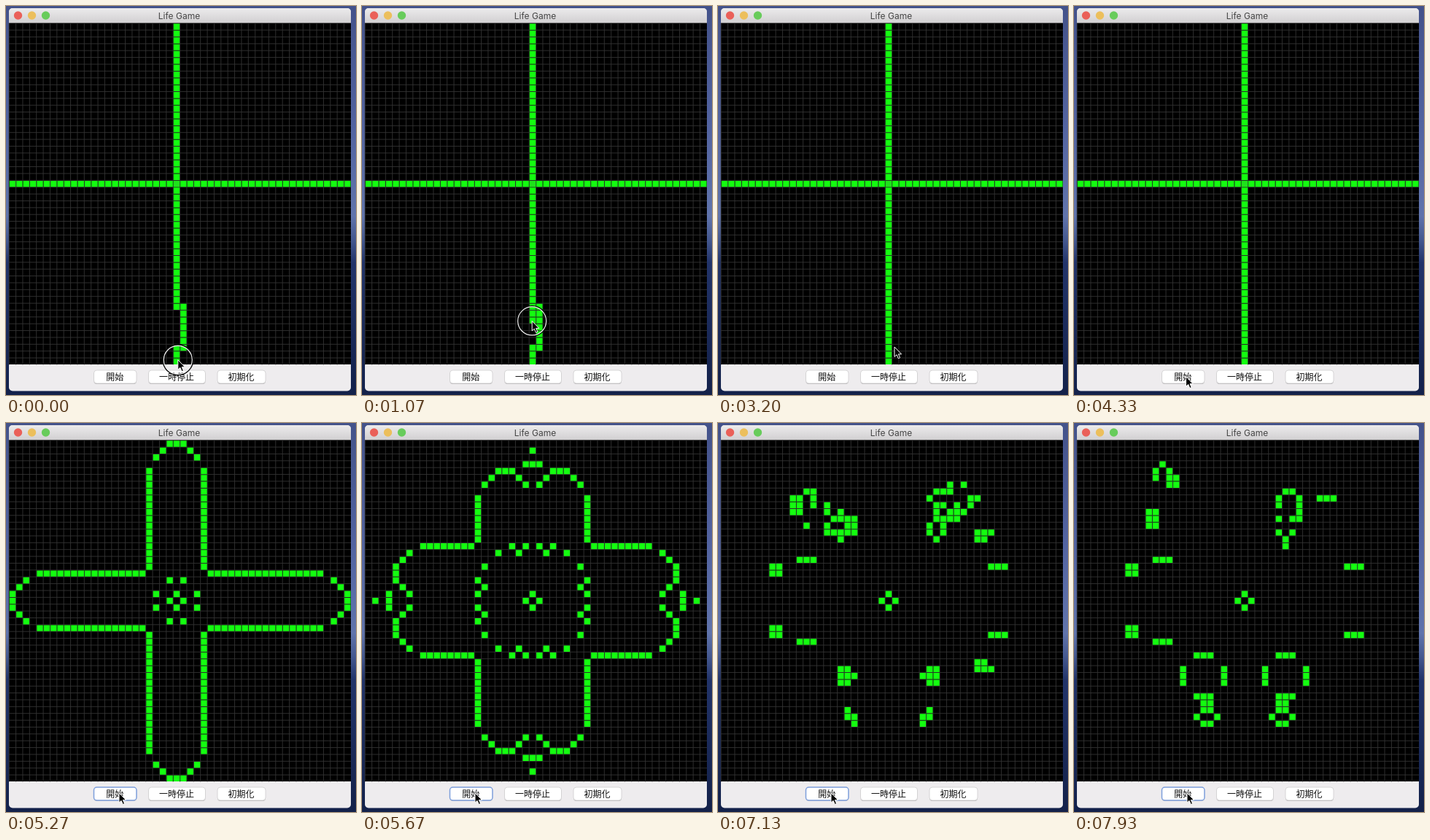
Animation of 480 by 534 pixels, one loop 8 s. Source, as an HTML page:

```html
<!DOCTYPE html>
<html lang="ja">
<head>
<meta charset="utf-8">
<title>Life Game</title>
<style>
  html, body { margin: 0; width: 100%; height: 100%; overflow: hidden; background: #14224a; }
  svg { display: block; }
  .title { font: 12px Inter, Roboto, sans-serif; fill: #444; }
  .label { font: 12px "Noto Sans CJK JP", "Noto Sans CJK", sans-serif; fill: #111; }
  text { text-anchor: middle; }
</style>
</head>
<body>
<svg width="480" height="534" viewBox="0 0 480 534">
  <defs>
    <linearGradient id="sky" x2="0" y2="1">
      <stop offset="0" stop-color="#43528a"/>
      <stop offset=".3" stop-color="#5263a0"/>
      <stop offset=".54" stop-color="#6074ac"/>
      <stop offset=".6" stop-color="#455990"/>
      <stop offset=".66" stop-color="#22346a"/>
      <stop offset="1" stop-color="#13214a"/>
    </linearGradient>
    <linearGradient id="bar" x2="0" y2="1">
      <stop offset="0" stop-color="#ecebec"/>
      <stop offset="1" stop-color="#d1cfd1"/>
    </linearGradient>
  </defs>
  <rect width="480" height="534" fill="url(#sky)"/>
  <rect x="4" y="3" width="469" height="525.500" rx="5" fill="#eeecee"/>
  <path d="M4 23.500V8a5 5 0 0 1 5-5H468a5 5 0 0 1 5 5V23.500Z" fill="url(#bar)"/>
  <circle cx="16.500" cy="13" r="5.700" fill="#ea6059"/>
  <circle cx="35.500" cy="13" r="5.700" fill="#ecbf5c"/>
  <circle cx="54.500" cy="13" r="5.700" fill="#68cc5b"/>
  <text class="title" x="237.500" y="17.800">Life Game</text>
  <rect x="4" y="23.500" width="469" height="468.500" fill="#000"/>
  <path id="grid" stroke="#343434" stroke-width=".9"/>
  <path id="cells" fill="#14fd10"/>
  <rect id="cross" fill="#1ee21a"/>
  <g id="buttons"></g>
  <g id="pointer">
    <g id="ring" fill="none">
      <circle r="20.700" stroke="#000" stroke-width="1.500"/>
      <circle r="19.500" stroke="#eee" stroke-width="1.200"/>
    </g>
    <path d="M0 0V13.500L3.100 10.700L5.300 15.800L7.600 14.800L5.400 9.900H9.600Z" fill="#000" stroke="#fff" stroke-width="1"/>
  </g>
</svg>
<script>
const LOOP = 8000, N = 50, SIZE = 9.375, LEFT = 4.2, TOP = 23.7;
const GAP = .6, FACE = 8.4;
const MID_COL = 24, MID_ROW = 23;
const START = 4800, STEP = 100, CLICK = 4650;
const FILL = [850, 1400], ERASE = [2400, 3100];
const PRESSES = [[0, 200], FILL, ERASE, [CLICK, CLICK + 130]];
// time, x, y of the pointer tip
const TRACK = [
  [0, 235.8, 485.8], [200, 235.8, 487], [750, 233, 414], [850, 233, 414],
  [1400, 233.5, 466], [1600, 236, 466], [2100, 241, 411.5], [2400, 241, 411.5],
  [3100, 242, 468], [3350, 242, 468], [4200, 153.6, 508.8], [4400, 153.6, 508.8],
  [4600, 155, 507.7], [LOOP, 155, 507.7]
];

const $ = id => document.getElementById(id);
const ease = u => u * u * (3 - 2 * u);

function pointerAt(t) {
  const i = TRACK.findIndex((k, n) => n && t <= k[0]);
  const [t0, x0, y0] = TRACK[i - 1], [t1, x1, y1] = TRACK[i];
  const u = ease((t - t0) / (t1 - t0));
  return [x0 + (x1 - x0) * u, y0 + (y1 - y0) * u];
}

const rowAt = t => Math.floor((pointerAt(t)[1] - TOP) / SIZE);
const makeBoard = rule => Array.from({ length: N }, (_, r) =>
  Array.from({ length: N }, (_, c) => rule(r, c) ? 1 : 0));

// Cells outside the board count as dead.
function evolve(board) {
  return makeBoard((r, c) => {
    let sum = -board[r][c];
    for (let y = r - 1; y <= r + 1; y++)
      for (let x = c - 1; x <= c + 1; x++) sum += board[y]?.[x] ?? 0;
    return sum === 3 || (sum === 2 && board[r][c]);
  });
}

const generations = [makeBoard((r, c) => r === MID_ROW || c === MID_COL)];
while (generations.length <= (LOOP - START) / STEP) generations.push(evolve(generations.at(-1)));

function sketch(t) {
  const filled = t < FILL[0] ? 0 : rowAt(Math.min(t, FILL[1]));
  const erased = t < ERASE[0] ? 0 : rowAt(Math.min(t, ERASE[1]));
  return makeBoard((r, c) => {
    if (r === MID_ROW) return true;
    if (c === MID_COL) return r < 42 || r > 46 || r <= filled;
    return c === MID_COL + 1 && r >= 41 && r <= 47 && r > erased;
  });
}

const cellX = c => LEFT + c * SIZE + GAP;
const cellY = r => TOP + r * SIZE + GAP;

function boardPath(board) {
  let d = "";
  board.forEach((row, r) => row.forEach((on, c) => {
    if (on) d += `M${cellX(c).toFixed(2)} ${cellY(r).toFixed(2)}h${FACE}v${FACE}h${-FACE}z`;
  }));
  return d;
}

function drawStatic() {
  const span = N * SIZE;
  let d = "";
  for (let i = 0; i < N; i++) {
    const p = i * SIZE;
    d += `M${LEFT + p} ${TOP}v${span}M${LEFT} ${TOP + p}h${span}`;
  }
  $("grid").setAttribute("d", d);
  const cross = { x: cellX(MID_COL), y: cellY(MID_ROW), width: FACE, height: FACE };
  for (const k in cross) $("cross").setAttribute(k, cross[k]);
  $("buttons").innerHTML = [["開始", 120.5, 58.5], ["一時停止", 195.5, 78], ["初期化", 290, 66]]
    .map(([name, x, w]) => `<rect x="${x}" y="501" width="${w}" height="18" rx="4" fill="#bdbbbd"/>
      <rect x="${x}" y="500" width="${w}" height="18" rx="4" fill="#fff" stroke="#cfcdcf" stroke-width=".8"/>
      <text class="label" x="${x + w / 2 - .4}" y="513.8">${name}</text>`).join("");
}

let shown = "";
function render(t) {
  const gen = t < START ? 0 : Math.floor((t - START) / STEP);
  const d = boardPath(gen || t > ERASE[1] ? generations[gen] : sketch(t));
  if (d !== shown) $("cells").setAttribute("d", shown = d);
  $("cross").style.display = gen ? "none" : "";

  const [x, y] = pointerAt(t);
  $("pointer").setAttribute("transform", `translate(${x.toFixed(2)} ${y.toFixed(2)})`);
  $("ring").style.display = PRESSES.some(([a, b]) => t >= a && t < b) ? "" : "none";

  const edge = $("buttons").querySelectorAll("rect")[1];
  const focus = t >= CLICK;
  edge.setAttribute("stroke", focus ? "#7d9fdc" : "#cfcdcf");
  edge.setAttribute("stroke-width", focus ? 1.5 : .8);
}

drawStatic();
const began = performance.now();
function tick() {
  render(Math.max(0, performance.now() - began) % LOOP);
  requestAnimationFrame(tick);
}
render(0);
requestAnimationFrame(tick);
</script>
</body>
</html>
```
